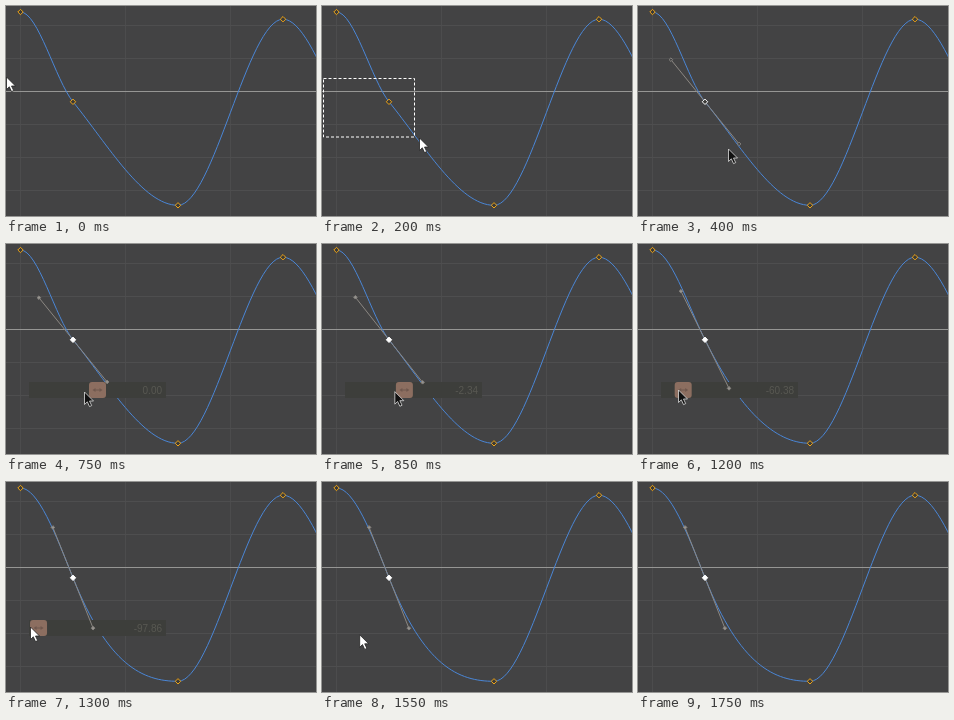
An HTML page with a canvas that plays this animation: 310 px wide and 210 px high, repeating every 1.8 s.

```html
<!DOCTYPE html>
<html>
<head>
<meta charset="utf-8">
<style>
html, body { margin: 0; width: 310px; height: 210px; overflow: hidden; background: #434344; }
canvas { display: block; }
</style>
</head>
<body>
<canvas id="stage" width="310" height="210"></canvas>
<script>
const ctx = document.getElementById('stage').getContext('2d');
const LOOP = 1800, STEP = 50;
const keys = [[14.5, 6], [67, 95.8], [172, 199.3], [277, 13.2], [382, 171]];

// Rows of time followed by values
const pointer = [
  [0, 0, 71], [50, 1, 72], [200, 97, 132], [300, 143, 141], [400, 90, 143],
  [550, 89, 147], [650, 89, 147], [750, 78, 148], [1050, 61, 147], [1200, 40, 146],
  [1300, 24, 145], [1350, 1, 144], [1400, 25, 138], [1500, 25, 138], [1750, 86, 212]
];
const drag = [[0, 0], [750, 0], [1050, .4588], [1300, .98924], [1350, 1], [1800, 1]];

function sample(track, t) {
  const i = track.findIndex(row => row[0] >= t);
  if (i < 1) return track.at(i).slice(1);
  const a = track[i - 1], b = track[i], k = (t - a[0]) / (b[0] - a[0]);
  return a.slice(1).map((v, j) => v + (b[j + 1] - v) * k);
}

function line(x1, y1, x2, y2, color) {
  ctx.strokeStyle = color;
  ctx.beginPath();
  ctx.moveTo(x1, y1);
  ctx.lineTo(x2, y2);
  ctx.stroke();
}

function diamond(x, y, r, stroke, fill) {
  ctx.beginPath();
  ctx.moveTo(x, y - r);
  ctx.lineTo(x + r, y);
  ctx.lineTo(x, y + r);
  ctx.lineTo(x - r, y);
  ctx.closePath();
  ctx.fillStyle = fill;
  ctx.fill();
  ctx.strokeStyle = stroke;
  ctx.stroke();
}

function grid() {
  ctx.fillStyle = '#434344';
  ctx.fillRect(0, 0, 310, 210);
  for (let x = 14.5; x < 310; x += 105) line(x, 0, x, 210, '#4c4c4d');
  for (let y = 19.5; y < 210; y += 33) line(0, y, 310, y, '#4e4e4f');
  line(0, 85.5, 310, 85.5, '#969694');
}

function curve(slope) {
  const slopes = [0, slope, 0, 0, 0];
  ctx.strokeStyle = '#4a86d6';
  ctx.beginPath();
  ctx.moveTo(...keys[0]);
  for (let i = 1; i < keys.length; i++) {
    const [x0, y0] = keys[i - 1], [x1, y1] = keys[i], d = (x1 - x0) / 3;
    ctx.bezierCurveTo(x0 + d, y0 + d * slopes[i - 1], x1 - d, y1 - d * slopes[i], x1, y1);
  }
  ctx.stroke();
}

function handles(slope, active) {
  const [x, y] = keys[1], dx = 54.2 / Math.hypot(1, slope), dy = dx * slope;
  line(x - dx, y - dy, x + dx, y + dy, '#8b8782');
  for (const s of [-1, 1])
    diamond(x + s * dx, y + s * dy, 1.8, '#85827e', active ? '#97948f' : '#434344');
}

function slider(q) {
  const x = 91.5 - 59.6 * q;
  ctx.fillStyle = '#3d3e3b';
  ctx.fillRect(23, 138, 137, 16);
  ctx.fillStyle = '#585852';
  ctx.font = '10px "Liberation Sans", Arial, sans-serif';
  ctx.textAlign = 'right';
  ctx.fillText((-100 * q * q || 0).toFixed(2), 156, 150);
  ctx.fillStyle = '#8c6e60';
  ctx.beginPath();
  ctx.roundRect(x - 8.5, 138, 17, 16, 3);
  ctx.fill();
  ctx.fillStyle = '#70584e';
  ctx.fillRect(x - 3, 145.5, 6, 1);
  for (const s of [-1, 1]) {
    ctx.beginPath();
    ctx.moveTo(x + s * 5, 146);
    ctx.lineTo(x + s * 2, 144);
    ctx.lineTo(x + s * 2, 148);
    ctx.fill();
  }
}

function marquee(x, y) {
  ctx.strokeStyle = '#fff';
  ctx.setLineDash([3, 2]);
  ctx.strokeRect(1.5, 72.5, x - 6, y - 73.5);
  ctx.setLineDash([]);
}

function arrow(x, y, dark) {
  ctx.save();
  ctx.translate(x + .5, y);
  const shape = new Path2D('M0 0V12.5L2.8 9.8L5 14.6L7.2 13.6L5 9H9Z');
  ctx.fillStyle = dark ? '#111' : '#fff';
  ctx.strokeStyle = dark ? '#ddd' : '#222';
  ctx.lineWidth = .8;
  ctx.fill(shape);
  ctx.stroke(shape);
  ctx.restore();
}

function draw() {
  const t = Math.floor(performance.now() % LOOP / STEP) * STEP;
  const [x, y] = sample(pointer, t), [q] = sample(drag, t);
  const slope = 1.235 + 1.3 * q * q;
  const selected = t >= 350, active = t >= 650;
  grid();
  curve(slope);
  if (active && t < 1400) slider(q);
  if (selected) handles(slope, active);
  keys.forEach(([kx, ky], i) => {
    const on = selected && i === 1;
    diamond(kx, ky, 2.7, on ? '#fff' : '#f0a414', on && active ? '#fff' : '#3a3a38');
  });
  if (t >= 100 && t <= 300) marquee(x, y);
  arrow(x, y, selected && t < 1250);
  requestAnimationFrame(draw);
}
draw();
</script>
</body>
</html>
```
